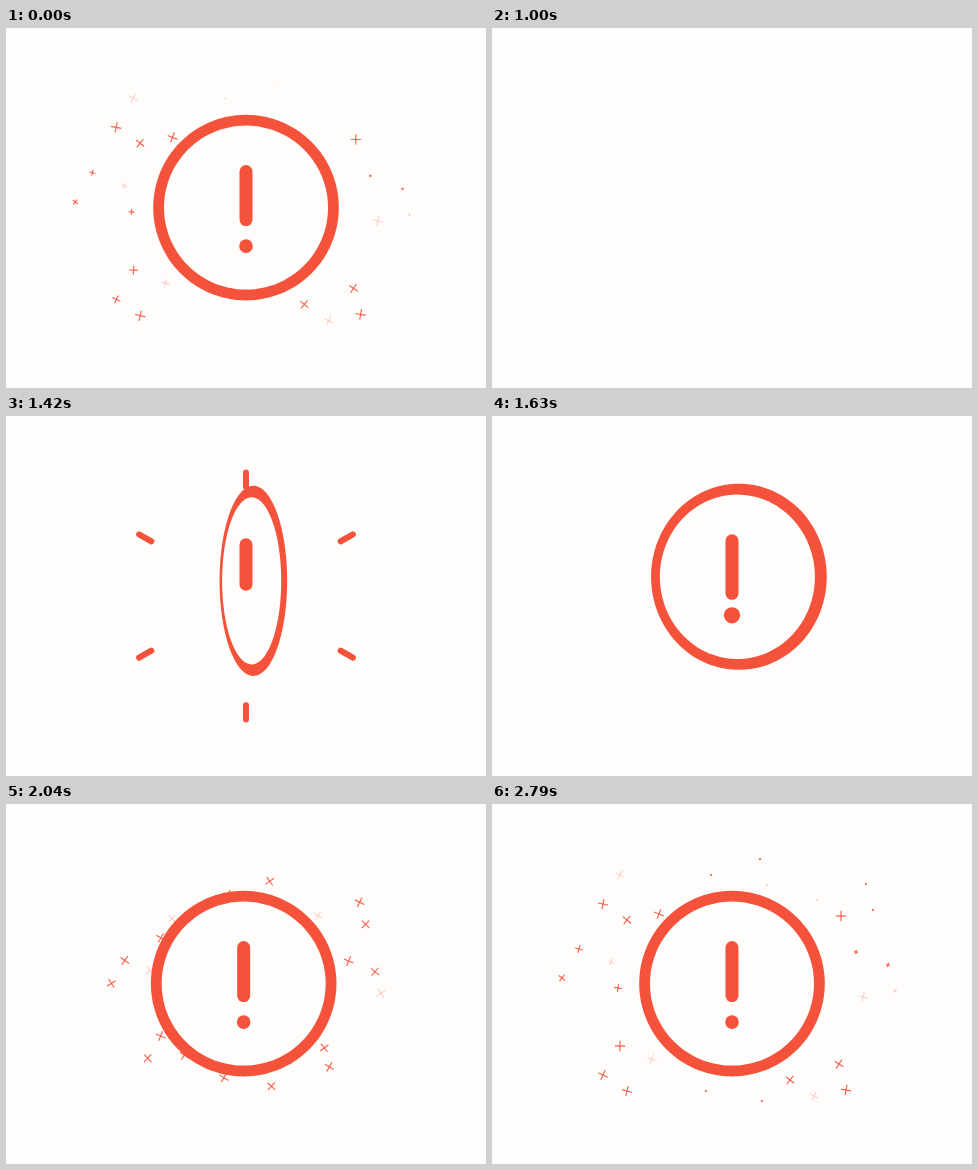
Animation of 480x360 px, one loop 2830 ms. Source, as an HTML page with a canvas:

```html
<!DOCTYPE html>
<html lang="en">
<head>
<meta charset="utf-8">
<title>Alert</title>
<style>
  html, body { margin: 0; width: 100%; height: 100%; overflow: hidden; background: #fffdfc; }
  canvas { display: block; width: 100%; height: 100%; }
</style>
</head>
<body>
<canvas id="stage" width="480" height="360"></canvas>
<script>
const ctx = document.getElementById('stage').getContext('2d');
const LOOP = 2830, RED = '#f5523b', PAPER = '#fffdfc', TAU = Math.PI * 2;
const BURST = { x: 240, y: 200, ease: 430, settle: 2790 };

const clamp = v => Math.min(1, Math.max(0, v));
const mix = (a, b, u) => a + (b - a) * u;
const part = (t, from, span) => clamp((t - from) / span);
const easeOut = (u, power) => 1 - Math.pow(1 - u, power);
const smooth = u => u * u * (3 - 2 * u);
const backOut = (u, c) => 1 + (c + 1) * Math.pow(u - 1, 3) + c * (u - 1) ** 2;

// Sparks settle in clusters that share one five-point pattern.
// + is a strong spark, - a faint one, . an empty place.
const pattern = [[0, 0], [17, -29], [49, -16], [56, 10], [24, 16]];
const clusters = [
  { x: 219, y: 71, born: 1305, sparks: '+.+-.' },
  { x: 325, y: 96, born: 1300, sparks: '-.+++' },
  { x: 347, y: 177, born: 1353, sparks: '.++--' },
  { x: 298, y: 276, born: 1535, sparks: '+.++-' },
  { x: 214, y: 287, born: 1300, sparks: '+..+.' },
  { x: 111, y: 271, born: 1485, sparks: '++-.+' },
  { x: 70, y: 174, born: 1430, sparks: '++-+.' },
  { x: 111, y: 100, born: 1630, sparks: '+-.++' }
];

const sparks = clusters.flatMap((c, n) => pattern.map(([dx, dy], i) => ({
  x: c.x + dx,
  y: c.y + dy,
  born: i === 4 ? mix(c.born, 1780, 0.75) : c.born,
  tilt: (n * 13 + i * 17) % 40,
  alpha: { '+': 0.9, '-': 0.24, '.': 0 }[c.sparks[i]]
}))).filter(s => s.alpha);

function line(x1, y1, x2, y2, width, cap) {
  ctx.lineWidth = width;
  ctx.lineCap = cap;
  ctx.beginPath();
  ctx.moveTo(x1, y1);
  ctx.lineTo(x2, y2);
  ctx.stroke();
}

function drawSpark({ x, y, born, tilt, alpha }, t) {
  const age = t - born;
  const size = 5.2 * clamp((1530 - age) / 220);
  if (size <= 0) return;
  const reach = ms => 1 - Math.exp(-ms / BURST.ease);
  const s = reach(age) / reach(BURST.settle - born);
  const turn = tilt + 20 * clamp((BURST.settle - t) / 750);
  ctx.save();
  ctx.globalAlpha = alpha;
  ctx.translate(mix(BURST.x, x, s), mix(BURST.y, y, s));
  ctx.rotate(turn * Math.PI / 180);
  line(-size, 0, size, 0, 1.15, 'butt');
  line(0, -size, 0, size, 1.15, 'butt');
  ctx.restore();
}

// Circle turned around its upright axis, seen in perspective
function turnedCircle(cx, cy, r, angle, color) {
  const c = Math.cos(angle), s = Math.sin(angle);
  ctx.beginPath();
  for (let i = 0; i < 120; i++) {
    const a = i / 120 * TAU, x = r * Math.cos(a);
    const zoom = 1 / (1 - x * s / 400);
    ctx.lineTo(cx + x * c * zoom, cy + r * Math.sin(a) * zoom);
  }
  ctx.closePath();
  ctx.fillStyle = color;
  ctx.fill();
}

function drawRing(cx, cy, t) {
  const angle = 225 * Math.PI / 180 * (1 - easeOut(part(t, 1080, 820), 2.18));
  turnedCircle(cx, cy, 92.8, angle, RED);
  turnedCircle(cx, cy, 82, angle, PAPER);
}

function drawRays(t) {
  const outer = mix(95, 139, easeOut(part(t, 1340, 200), 2));
  const inner = mix(95, 139, part(t, 1340, 250));
  if (outer <= inner) return;
  for (let i = 0; i < 6; i++) {
    const a = i * TAU / 6 - TAU / 4, c = Math.cos(a), s = Math.sin(a);
    line(240 + c * inner, 180 + s * inner, 240 + c * outer, 180 + s * outer, 6, 'round');
  }
}

function drawMark(cx, cy, t) {
  const length = 61 * backOut(part(t, 1294, 467), 1.7);
  const dot = 6.8 * backOut(part(t, 1430, 380), 2.6);
  if (length > 13) {
    const top = cy - 36;
    line(cx, top, cx, top + length - 13, 13, 'round');
  }
  if (dot > 0) {
    ctx.fillStyle = RED;
    ctx.beginPath();
    ctx.arc(cx, cy + 38.5, dot, 0, TAU);
    ctx.fill();
  }
}

// Rise from below, drop to rest, then a slight dip
function height(t) {
  const rise = mix(400, 159, easeOut(part(t, 1080, 480), 3));
  const drop = 20.6 * smooth(part(t, 1560, 390));
  return rise + drop + Math.sin(Math.PI * part(t, 2040, 540));
}

function shake(t) {
  const ms = Math.max(0, t - 1960);
  return 4.5 * Math.exp(-ms / 150) * Math.sin(ms / 120 * TAU);
}

function draw(t) {
  ctx.fillStyle = PAPER;
  ctx.fillRect(0, 0, 480, 360);
  if (t < 1080) return;
  ctx.strokeStyle = RED;
  if (t > 1700) sparks.forEach(s => drawSpark(s, t));
  const cx = 240 + shake(t), cy = height(t);
  drawRing(cx, cy, t);
  drawRays(t);
  drawMark(cx, cy, t);
}

// The first second shows the end of the previous burst
const start = performance.now();
function tick() {
  const t = Math.max(0, performance.now() - start) % LOOP;
  draw(t < 1000 ? t + LOOP : t);
  requestAnimationFrame(tick);
}
tick();
</script>
</body>
</html>
```
